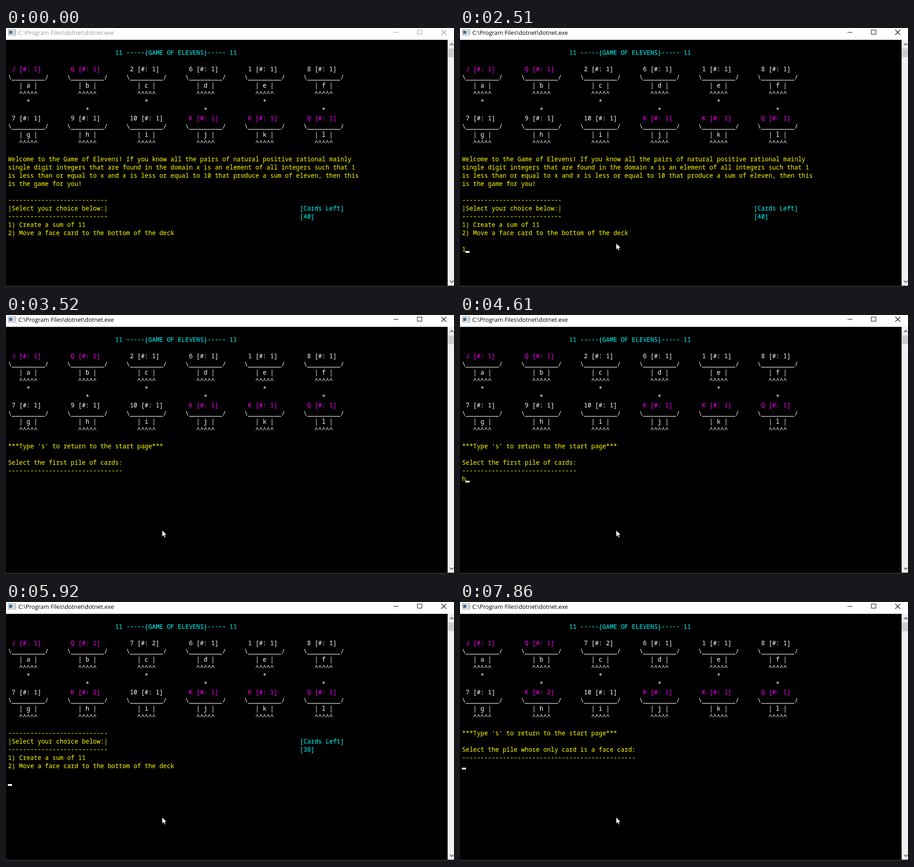
Write an HTML page with a canvas that moves like this. It is 984 by 569 pixels and loops after 8000 ms.

```html
<!DOCTYPE html>
<html lang="en">
<head>
<meta charset="utf-8">
<title>Game of Elevens</title>
<style>
html, body { margin: 0; width: 100%; height: 100%; overflow: hidden; background: #000; }
canvas { display: block; }
</style>
</head>
<body>
<canvas id="stage" width="984" height="569"></canvas>
<script>
const ctx = document.getElementById('stage').getContext('2d');
const LOOP = 8000, CELL = 8.11, LINE = 18, LEFT = 4.5, TOP = 27;
const WHITE = '#fff', YELLOW = '#ff0', CYAN = '#0ff', MAGENTA = '#f0f';

function rect(color, x, y, w, h) {
  ctx.fillStyle = color;
  ctx.fillRect(x, y, w, h);
}

function polyline(color, width, ...points) {
  ctx.strokeStyle = color;
  ctx.lineWidth = width;
  ctx.beginPath();
  points.forEach(([x, y]) => ctx.lineTo(x, y));
  ctx.stroke();
}

// Console text sits on a fixed character grid.
function print(col, row, text, color = YELLOW) {
  ctx.font = '13.515px "Noto Sans Mono", monospace';
  ctx.fillStyle = color;
  [...text].forEach((char, i) => {
    if (char !== ' ') ctx.fillText(char, LEFT + (col + i) * CELL, TOP + row * LINE + 14);
  });
}

function drawPiles(cards) {
  print(29, 1, '11 -----{GAME OF ELEVENS}----- 11', CYAN);
  cards.forEach((card, i) => {
    const col = i % 6 * 16, row = i < 6 ? 3 : 9;
    const [name, count = 1] = card.split('x');
    print(col + 1, row, `${name} [#: ${count}]`, /[JQK]/.test(name) ? MAGENTA : WHITE);
    print(col, row + 1, '\\_________/', WHITE);
    print(col + 3, row + 2, `| ${'abcdefghijkl'[i]} |`, WHITE);
    print(col + 3, row + 3, '^^^^^', WHITE);
    if (i < 6) print(col + 5, 7 + i % 2, '*', WHITE);
  });
}

function drawMenu(row, cardsLeft) {
  print(0, row, '-'.repeat(27));
  print(0, row + 1, '|Select your choice below:|');
  print(0, row + 2, '-'.repeat(27));
  print(0, row + 3, '1) Create a sum of 11');
  print(0, row + 4, '2) Move a face card to the bottom of the deck');
  print(79, row + 1, '[Cards Left]', CYAN);
  print(79, row + 2, `[${cardsLeft}]`, CYAN);
}

function drawPrompt(row, text, dashes) {
  print(0, row, text);
  print(0, row + 1, '-'.repeat(dashes));
}

const firstDeal = ['J', 'Q', '2', '6', '1', '8', '7', '9', '10', 'K', 'K', 'Q'];
const secondDeal = ['J', 'Q', '7x2', '6', '1', '8', '7', 'Kx2', '10', 'K', 'K', 'Q'];
const RETURN_HINT = "***Type 's' to return to the start page***";

const screens = {
  blank() {},
  welcome() {
    drawPiles(firstDeal);
    [
      'Welcome to the Game of Elevens! If you know all the pairs of natural positive rational mainly',
      'single digit integers that are found in the domain x is an element of all integers such that 1',
      'is less than or equal to x and x is less or equal to 10 that produce a sum of eleven, then this',
      'is the game for you!'
    ].forEach((text, i) => print(0, 14 + i, text));
    drawMenu(19, 40);
  },
  firstPile() {
    drawPiles(firstDeal);
    print(0, 14, RETURN_HINT);
    drawPrompt(16, 'Select the first pile of cards:', 31);
  },
  secondPile() {
    screens.firstPile();
    print(0, 18, 'h');
    drawPrompt(20, 'Select the second pile of cards:', 31);
  },
  menu() {
    drawPiles(secondDeal);
    drawMenu(14, 38);
  },
  facePile() {
    drawPiles(secondDeal);
    print(0, 14, RETURN_HINT);
    drawPrompt(16, 'Select the pile whose only card is a face card:', 47);
  }
};

// [start ms, screen, input row, typed key, caret column, caret row if not the input row]
const steps = [
  [0, 'welcome', 25, ''],
  [890, 'welcome', 25, '', 0],
  [960, 'welcome', 25, ''],
  [1420, 'welcome', 25, '', 0],
  [1900, 'welcome', 25, ''],
  [2430, 'welcome', 25, '', 0],
  [2510, 'welcome', 25, '1', 1],
  [2740, 'blank', 26, '', -1],
  [2820, 'firstPile', 18, '', 0],
  [3520, 'firstPile', 18, ''],
  [3980, 'firstPile', 18, '', 0],
  [4530, 'firstPile', 18, ''],
  [4610, 'firstPile', 18, 'h', 1],
  [4840, 'secondPile', 22, '', 0],
  [5620, 'secondPile', 22, 'c'],
  [5850, 'blank', 23, '', -1],
  [5920, 'menu', 20, '', 0],
  [6630, 'menu', 20, ''],
  [7160, 'menu', 20, '', 0],
  [7470, 'menu', 20, '2', 1],
  [7700, 'menu', 20, '2', -1, 21],
  [7780, 'facePile', 18, ''],
  [7860, 'facePile', 18, '', 0]
];

const pointerPath = [
  [500, 384, 551], [570, 371, 523], [640, 353, 491], [720, 343, 473]
];

const current = (list, time) => list.filter(([start]) => start <= time).pop();

function drawWindow(active) {
  const ink = active ? '#000' : '#999';
  rect('#fff', 0, 0, 984, 26);

  rect('#8c8c8c', 5, 3, 17, 13);
  rect('#f4f4f4', 6, 4, 15, 11);
  rect('#3f6f9f', 7, 6, 7, 7);
  rect('#c4c4c4', 16, 6, 4, 7);

  ctx.font = '12.8px "Open Sans", sans-serif';
  ctx.fillStyle = ink;
  ctx.fillText('C:\\Program Files\\dotnet\\dotnet.exe', 27, 14.5);

  polyline(ink, 1, [851, 9.5], [862, 9.5]);
  ctx.strokeRect(903.5, 4.5, 10, 9);
  polyline(ink, 1.1, [956, 4], [967, 15]);
  polyline(ink, 1.1, [967, 4], [956, 15]);

  rect('#f0f0f0', 970, 26, 14, 541);
  rect('#cdcdcd', 971, 45, 13, 19);
  polyline('#505050', 1.7, [975, 38], [979, 34], [983, 38]);
  polyline('#505050', 1.7, [975, 555], [979, 559], [983, 555]);
  rect('#262626', 0, 566, 984, 3);
}

function drawPointer(x, y) {
  const outline = [[0, 0], [0, 14], [3, 11], [5.5, 16], [7.5, 15], [5.2, 10.2], [9.8, 10]];
  ctx.beginPath();
  outline.forEach(([dx, dy]) => ctx.lineTo(x + dx, y + dy));
  ctx.closePath();
  ctx.fillStyle = '#fff';
  ctx.fill();
  ctx.strokeStyle = '#000';
  ctx.lineWidth = 0.6;
  ctx.stroke();
}

function draw(time) {
  const [, screen, row, typed, caretCol, caretRow = row] = current(steps, time);
  rect('#000', 0, 0, 984, 569);
  screens[screen]();
  print(0, row, typed);
  if (caretCol !== undefined) {
    rect(WHITE, Math.round(4 + caretCol * CELL), TOP + caretRow * LINE + 13, 9, 4);
  }
  drawWindow(time >= 890);
  const pointer = current(pointerPath, time);
  if (pointer) drawPointer(pointer[1], pointer[2]);
}

const begin = performance.now();
function tick() {
  draw((performance.now() - begin) % LOOP);
  requestAnimationFrame(tick);
}
tick();
</script>
</body>
</html>
```
